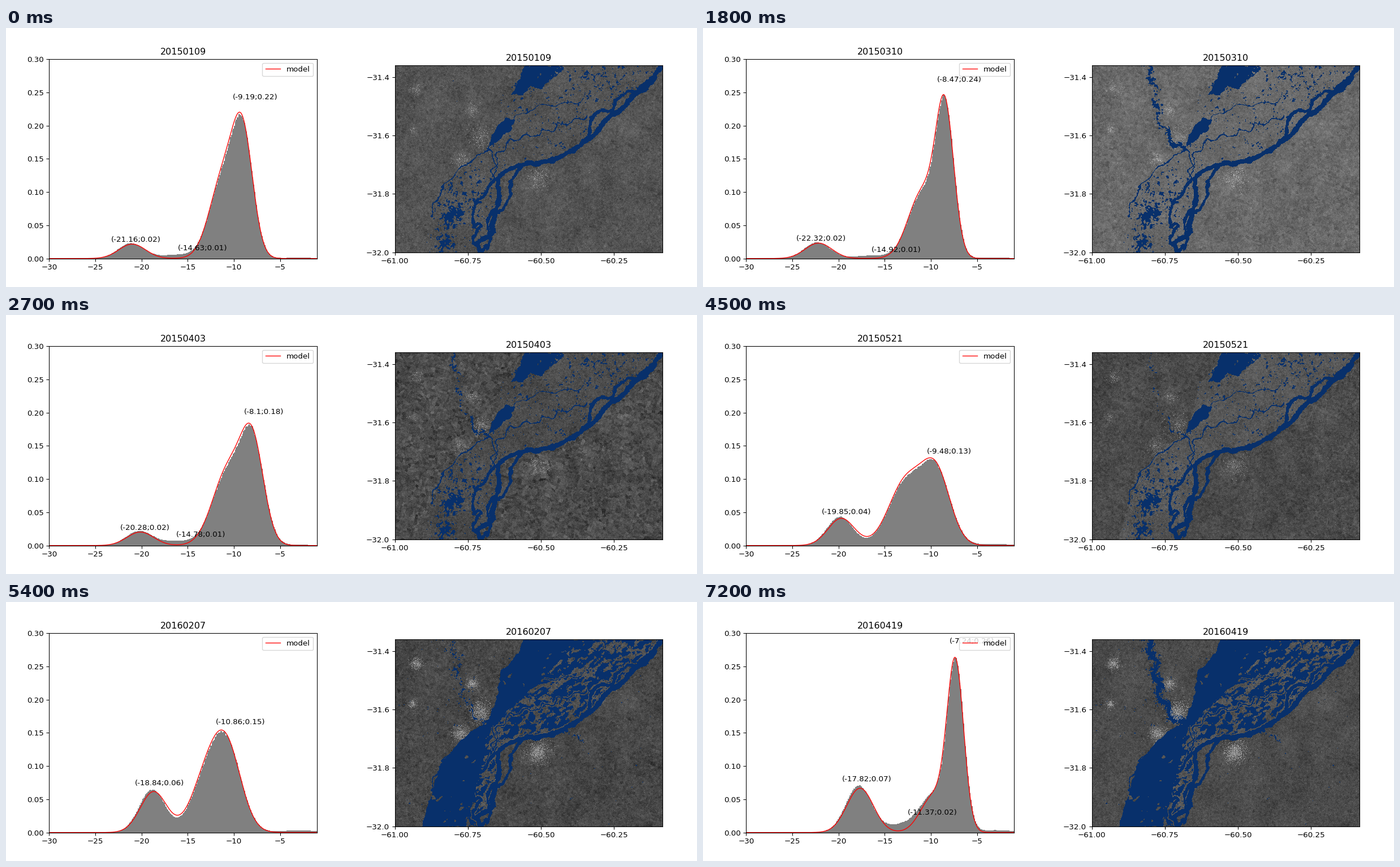
Write a matplotlib script that moves like this. It is 1222 px wide and 458 px high and loops after 8.1 s.

```python
import numpy as np
import matplotlib.pyplot as plt
from matplotlib.animation import FuncAnimation
from matplotlib.path import Path

SW, SH, DPI = 1222, 458, 96
W, H = 474, 331
X, Y = np.meshgrid(687.5 + np.arange(W), 66.5 + np.arange(H))
WATER = np.array([8, 48, 107])
STEP = 4


# ---------- noise and shape helpers ----------

def smooth(size, seed, stretch=1.0):
    """Unit-variance noise, optionally stretched along the river's course."""
    white = np.random.default_rng(seed).standard_normal((H, W))
    ky, kx = np.meshgrid(np.fft.fftfreq(H), np.fft.fftfreq(W), indexing="ij")
    along, across = 0.8 * kx - 0.6 * ky, 0.6 * kx + 0.8 * ky
    k2 = (along * stretch) ** 2 + across ** 2
    out = np.fft.ifft2(np.fft.fft2(white) * np.exp(-2 * (np.pi * size) ** 2 * k2)).real
    return (out - out.mean()) / out.std()


# Slightly displaced coordinates give every shape a natural edge.
WX = X + 1.1 * smooth(4, 1) + 0.5 * smooth(1.2, 2)
WY = Y + 1.1 * smooth(4, 3) + 0.5 * smooth(1.2, 4)


def course(*pts):
    """Round a polyline off and resample it evenly."""
    p = np.array(pts, float)
    for _ in range(2):
        a, b = p[:-1], p[1:]
        cut = np.stack([0.75 * a + 0.25 * b, 0.25 * a + 0.75 * b], 1).reshape(-1, 2)
        p = np.vstack([p[:1], cut, p[-1:]])
    s = np.r_[0, np.cumsum(np.hypot(*np.diff(p, axis=0).T))]
    t = np.linspace(0, s[-1], int(s[-1] / STEP) + 1)
    return np.column_stack([np.interp(t, s, p[:, 0]), np.interp(t, s, p[:, 1])])


def shifted(line, amount):
    d = np.gradient(line, axis=0)
    d /= np.hypot(*d.T)[:, None]
    return line + np.column_stack([d[:, 1], -d[:, 0]]) * amount[:, None]


def meander(amp, wave, *pts):
    line = course(*pts)
    return shifted(line, amp * np.sin(2 * np.pi * STEP * np.arange(len(line)) / wave))


def side_arm(line, start, end, bulge):
    """Channel that leaves a line and rejoins it, bulging sideways between."""
    part = line[int(start * len(line)):int(end * len(line)) + 1]
    return shifted(part, bulge * np.sin(np.linspace(0, np.pi, len(part))) ** 0.7)


def reach(line, width):
    """Signed distance to the edge of a channel."""
    dist2 = np.full(X.shape, 1e9)
    for (ax, ay), (bx, by) in zip(line[:-1], line[1:]):
        dx, dy = bx - ax, by - ay
        t = np.clip(((WX - ax) * dx + (WY - ay) * dy) / (dx * dx + dy * dy), 0, 1)
        dist2 = np.minimum(dist2, (WX - ax - t * dx) ** 2 + (WY - ay - t * dy) ** 2)
    return np.sqrt(dist2) - width / 2


def area(pts):
    grid = np.column_stack([WX.ravel(), WY.ravel()])
    return Path(pts).contains_points(grid).reshape(X.shape)


def blob(cx, cy, r):
    return np.exp(-((X - cx) ** 2 + (Y - cy) ** 2) / (2 * r * r))


# ---------- geography ----------

trunk = course((1160, 66), (1140, 92), (1106, 119), (1088, 146), (1060, 157), (1046, 185),
               (990, 223), (950, 241), (912, 237), (866, 262), (874, 300), (860, 335),
               (862, 366), (830, 378), (838, 398))
main_river = reach(trunk, 8.5)
for start, end, bulge in [(0.03, 0.16, 6), (0.13, 0.25, -17), (0.24, 0.36, -20),
                          (0.62, 0.83, 22), (0.71, 0.97, -38), (0.81, 0.92, -9),
                          (0.91, 1, 20)]:
    main_river = np.minimum(main_river, reach(side_arm(trunk, start, end, bulge), 5.5))

side_rivers = np.minimum.reduce([
    reach(meander(2, 40, (858, 205), (840, 224), (800, 245), (764, 295), (749, 334)), 2),
    reach(meander(4, 30, (1028, 156), (975, 173), (945, 187), (895, 197), (867, 222),
                  (860, 262)), 2),
    reach(meander(4, 45, (893, 164), (942, 135), (1000, 135), (1020, 124)), 1.4),
    reach(meander(2, 30, (852, 213), (868, 245), (861, 262)), 2.2),
])
salado = reach(meander(5, 40, (780, 60), (800, 100), (803, 170), (846, 216)), 0)
creek = reach(meander(3, 20, (985, 230), (1005, 233), (1020, 247)), 2)

west_edge = [(912, 66), (905, 90), (874, 122), (868, 165), (857, 205), (800, 245),
             (768, 288), (747, 350), (733, 398)]
valley = area(west_edge + list(trunk[::-1]))
open_water = np.where(WY < 225, WX + 1.04 * (WY - 66) < 1018, WX + 0.25 * (WY - 250) < 850)

pond_noise = 0.8 * smooth(0.9, 11) + 0.6 * smooth(2.6, 12)
pond_rich = valley * (0.3 + 0.6 * blob(810, 295, 40) + 0.6 * blob(1060, 90, 35)
                      + 3.2 * blob(789, 331, 13) + 3.2 * blob(775, 381, 10))
ponds = (pond_noise + pond_rich > 2.15) & (pond_rich > 0.2)

lakes = area([(914, 66), (982, 66), (986, 76), (960, 90), (945, 110), (928, 100),
              (912, 119), (892, 119), (904, 98)]) & (pond_noise > 0.04 * (X - 985))
lakes |= area([(884, 158), (897, 162), (894, 178), (862, 207), (854, 206), (867, 175)])

braid = smooth(1.8, 21, 1.9)
fine = smooth(1.0, 22)
ridges = np.abs(smooth(5, 23)) + 0.35 * np.abs(smooth(2, 24))
urban = sum(blob(*c) for c in [(839, 195, 11), (940, 266, 11), (725, 109, 6),
                               (803, 233, 8), (824, 145, 6), (719, 181, 4)])

# Tilted farm parcels.
ROWS = ((0.95 * X + 0.3 * Y + 2 * smooth(5, 31)) / 6).astype(int) % 90
COLS = ((0.95 * Y - 0.3 * X + 2 * smooth(5, 32)) / 5 + 90).astype(int) % 90


def build_map(seed, flooded, base, parcels, veins, salado_w):
    rng = np.random.default_rng(seed)
    field = rng.standard_normal((90, 90))[ROWS, COLS]
    gray = base + 7 * rng.standard_normal(X.shape) + 4 * fine + 3 * smooth(12, 41)
    gray += parcels * field * ~valley - 8 * (smooth(2, 42) > 1.3)
    gray += (10 if flooded else veins) * valley
    gray += veins * np.clip((X - 1030) / 60, 0, 1) * (ridges < 0.32) * ~valley

    town = rng.random(X.shape) < (0.85 if flooded else 0.2) * np.clip(urban, 0, 1)
    gray += 18 * urban + town * rng.uniform(20, 90, X.shape)
    gray += (rng.random(X.shape) < 0.0015) * 45

    water = lakes | ponds | (side_rivers < 0) | (salado + 2.6 * pond_noise < salado_w)
    if flooded:
        levee = (np.abs(np.minimum(main_river, side_rivers) - 1) < 0.8) & ~open_water
        level = np.where(open_water, -1.9, -0.25)
        water |= valley & (0.9 * braid + 0.4 * fine > level) & ~levee
        water |= 2 * np.exp(-np.abs(salado) / 18) * (X < 850) + pond_noise > 3.1
        water |= creek + pond_noise < 0
        water &= ~(town & (urban > 0.45))
    rgb = np.repeat(np.clip(gray, 20, 235)[..., None], 3, axis=2)
    rgb[water | (main_river < 0)] = WATER
    return rgb.astype(np.uint8)


# ---------- histogram and model ----------

# date, labelled modes (dB, density), shoulder (dB, density, sigma),
# look (base gray, parcel contrast, vein contrast, side river width)
jan = ("20150109", [(-21.16, .0228), (-14.63, .0112), (-9.19, .218)],
       (-11.1, .123, 1.5), (84, 3, 0, -5))
mar = ("20150310", [(-22.32, .0244), (-14.92, .0089), (-8.47, .2417)],
       (-10.9, .1, 1.55), (106, 5, 0, 2.6))
early_apr = ("20150403", [(-20.28, .0213), (-14.78, .0124), (-8.1, .1797)],
             (-10.6, .113, 1.7), (76, 9, 0, .4))
late_apr = ("20150427", [(-20.86, .0213), (-12.09, .1259), (-8.1, .1034)],
            (-12.2, .125, 2.1), (77, 4, 25, -2.2))
flood = ("20160207", [(-18.84, .0647), (-10.86, .148)],
         (-13.2, .067, 1.6), (72, 4, 0, -1))
crest = ("20160419", [(-17.82, .0701), (-11.37, .0244), (-7.24, .2591)],
         (-9.7, .055, 1.4), (76, 1, 0, 5))


def between(date, a, b):
    """Scene halfway between two others."""
    if len(a[1]) == len(b[1]):
        modes = np.mean([a[1], b[1]], 0)
    else:
        modes = np.mean([[s[1][0], s[1][-1]] for s in (a, b)], 0)
    return date, modes, np.mean([a[2], b[2]], 0), np.mean([a[3], b[3]], 0)


SCENES = [jan, between("20150214", jan, mar), mar, early_apr, late_apr,
          between("20150521", late_apr, flood), flood,
          between("20160326", flood, crest), crest]

edges = np.arange(-30, -0.95, 0.1)
centres = (edges[:-1] + edges[1:]) / 2
xs = np.linspace(-30, -1, 600)


def mixture(x, parts):
    return sum(h * np.exp(-0.5 * ((x - c) / s) ** 2) for c, h, s in parts)


def components(modes, shoulder):
    """Water, shoulder and land peaks whose total area is one."""
    (wx, wh), (lx, lh) = modes[0], modes[-1]
    water = (wx + 0.15, 0.95 * wh, 1.45)
    under = mixture(lx, [shoulder])
    height = 1.01 * lh - under
    rest = 1 / np.sqrt(2 * np.pi) - water[1] * water[2] - shoulder[1] * shoulder[2]
    return [water, shoulder, (lx + under / height - 0.15, height, rest / height)]


def bar_heights(modes, shoulder, seed):
    wx, wh = modes[0]
    _, (sx, sh, ss), (lx, lh, ls) = components(modes, shoulder)
    parts = [(wx, wh, 1.4), (sx, 0.97 * sh, ss), (lx + 0.04, lh, ls), (-3, 0.05 * wh, 2)]
    if len(modes) == 3 and modes[1][1] < 0.05:
        mx, mh = modes[1]
        parts.append((mx - 1.5, mh / 2, 1.9))
    jitter = np.random.default_rng(seed).normal(1, 0.006, len(centres))
    return mixture(centres, parts) * jitter


bars, curves, maps = [], [], []
for i, (_, modes, shoulder, look) in enumerate(SCENES):
    bars.append(bar_heights(modes, shoulder, 70 + i))
    curves.append(mixture(xs, components(modes, shoulder)))
    maps.append(build_map(100 + i, modes[0][1] > 0.05, *look))

# ---------- figure ----------

fig = plt.figure(figsize=(SW / DPI, SH / DPI), dpi=DPI)


def panel(left, top, right, bottom):
    return fig.add_axes([left / SW, 1 - bottom / SH, (right - left) / SW, (bottom - top) / SH])


hist_ax = panel(76.4, 55, 550, 407.6)
hist_ax.set(xlim=(-30, -1), ylim=(0, 0.3), xticks=range(-30, -4, 5))
hist = hist_ax.stairs(bars[0], edges, fill=True, color="gray", lw=0)
model, = hist_ax.plot(xs, curves[0], color="red", lw=1, label="model")
tags = [hist_ax.text(0, 0, "") for _ in range(3)]
hist_ax.legend(loc="upper right")

map_ax = panel(687.5, 66, 1161, 396.6)
extent = (-61, -60.084, -32, -31.359)
image = map_ax.imshow(maps[0], extent=extent, aspect="auto", interpolation="nearest")
map_ax.set(xticks=np.arange(-61, -60.2, 0.25), yticks=np.arange(-32, -31.3, 0.2))
map_ax.set(xlim=extent[:2], ylim=extent[2:])


def draw(i):
    date, modes = SCENES[i][:2]
    hist_ax.set_title(date)
    map_ax.set_title(date)
    hist.set_data(bars[i])
    model.set_ydata(curves[i])
    image.set_data(maps[i])
    for tag in tags:
        tag.set_text("")
    for tag, (x, h) in zip(tags, modes):
        tag.set_position((1.1 * x, 1.1 * h))
        tag.set_text(f"({round(x, 2):g};{round(h, 2):g})")
    return []


anim = FuncAnimation(fig, draw, frames=len(SCENES), interval=900, repeat=True, repeat_delay=0)
plt.show()
```
